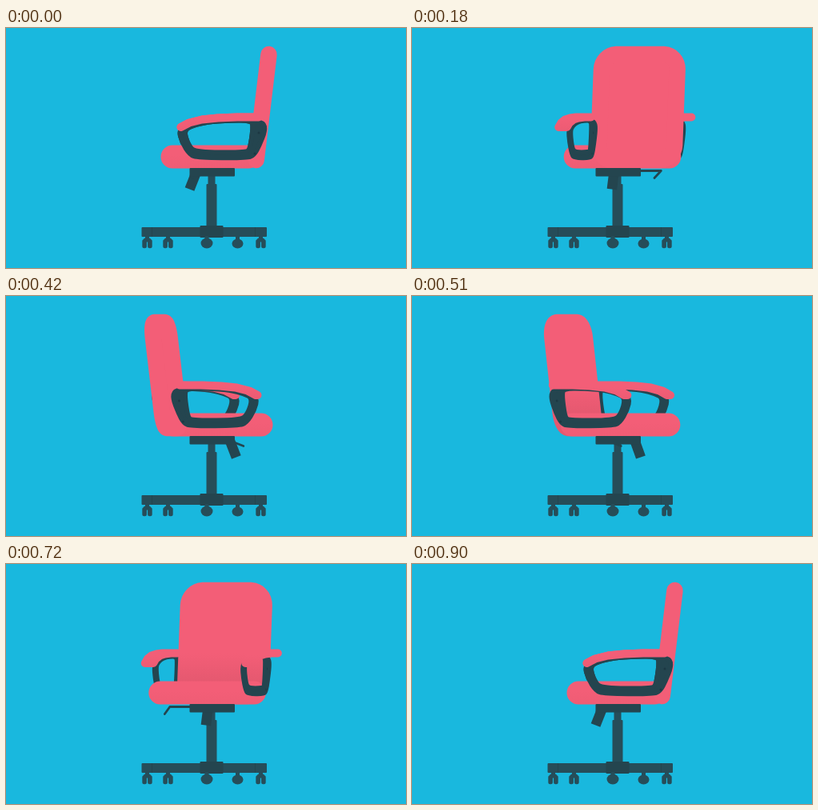
An HTML page with a canvas that plays this animation: 500 by 300 pixels, repeating every 930 ms.

```html
<!DOCTYPE html>
<html lang="en">
<head>
<meta charset="utf-8">
<title>Swivel chair</title>
<style>
html, body { margin: 0; width: 500px; height: 300px; overflow: hidden; background: #19b8de; }
canvas { display: block; }
</style>
</head>
<body>
<canvas id="stage" width="500" height="300"></canvas>
<script>
const ctx = document.getElementById('stage').getContext('2d');
const BG = '#19b8de', PINK = '#f35e77', SHADE = '#e4586f';
const DARK = '#24454f', DEEP = '#1c3843', METAL = '#264d59';
const AXIS = 259, STEP = 30, STEPS = 31;
let cos = 1, sin = 0;

// u runs front to back, v from side to side, y is the screen height
const project = ([u, v, y]) => [AXIS + u * cos + v * sin, y];

function line(points) {
  points.map(project).forEach(([x, y], i) => i ? ctx.lineTo(x, y) : ctx.moveTo(x, y));
}

function smooth(points) {
  const p = points.map(project), n = p.length;
  const mid = i => [(p[i % n][0] + p[(i + 1) % n][0]) / 2, (p[i % n][1] + p[(i + 1) % n][1]) / 2];
  ctx.moveTo(...mid(0));
  for (let i = 1; i <= n; i++) ctx.quadraticCurveTo(...p[i % n], ...mid(i));
  ctx.closePath();
}

// Fill and outline the current path, so it gets a round thickness
function puff(color, width) {
  ctx.fillStyle = ctx.strokeStyle = color;
  ctx.lineWidth = width;
  ctx.lineJoin = ctx.lineCap = 'round';
  ctx.fill('evenodd');
  ctx.stroke();
}

function fade(y0, y1, from, to) {
  const g = ctx.createLinearGradient(0, y0, 0, y1);
  g.addColorStop(0, from);
  g.addColorStop(1, to);
  return g;
}

// Points of a rounded rectangle; r1 rounds the low-q corners, r2 the others
function roundRect(p0, p1, q0, q1, r1, r2) {
  const corners = [[p1 - r2, q1 - r2, r2], [p0 + r2, q1 - r2, r2], [p0 + r1, q0 + r1, r1], [p1 - r1, q0 + r1, r1]];
  return corners.flatMap(([p, q, r], k) => Array.from({ length: 9 }, (_, i) => {
    const a = (k + i / 8) * Math.PI / 2;
    return [p + r * Math.cos(a), q + r * Math.sin(a)];
  }));
}

const backShape = roundRect(-45, 54.5, 33, 165, 19, 19)
  .map(([v, y]) => [69.5 - (y - 33) * 0.12, v, y]);
const seatShape = roundRect(-43, 55, -51, 44, 7, 12).map(([v, u]) => [u, v, 161]);
const frameOuter = [[-43, 127], [-39, 143], [-29, 158.5], [-19, 162], [42, 162.5], [51, 159],
  [58, 146], [65, 128], [63, 118], [40, 114], [16, 114], [-10, 116], [-28, 121]];
const frameHole = [[-37, 128], [-31, 147], [-22, 155.5], [40, 155.5], [46, 152],
  [50, 124], [48, 115.5], [20, 115.3], [-8, 117.5], [-26, 122]];
const padLine = [[-40.5, 124], [-30, 118.5], [-14, 114.5], [6, 112.5], [30, 111.5], [57, 111.5]];
const screws = [[57, 131], [52, 157]];

function drawBack() {
  ctx.beginPath();
  line(backShape);
  ctx.closePath();
  puff(sin < -0.1 ? fade(112, 150, PINK, SHADE) : PINK, 20.5);
}

function drawSeat() {
  ctx.beginPath();
  line(seatShape);
  ctx.closePath();
  puff(fade(158, 178, PINK, '#ee5c74'), 29);
}

function drawArm(side, near) {
  const v = 5.5 + side * 58, pad = 5 + side * 66;
  const at = ([u, y]) => [u, v, y];
  ctx.beginPath();
  smooth(frameOuter.map(at));
  smooth(frameHole.map(at));
  puff(DARK, 6);
  if (near && Math.abs(cos) > 0.3) {
    ctx.fillStyle = DEEP;
    for (const s of screws) {
      const [x, y] = project(at(s));
      ctx.beginPath();
      ctx.ellipse(x, y, 1.5 * Math.abs(cos), 1.5, 0, 0, 7);
      ctx.fill();
    }
  }
  ctx.beginPath();
  line([...padLine.map(([u, y]) => [u, pad + 5.5, y]),
    ...padLine.map(([u, y]) => [u, pad - 5.5, y]).reverse()]);
  ctx.closePath();
  puff(fade(114, 130, PINK, '#ec5b73'), 10);
}

function stroke(points, width, color, cap) {
  ctx.beginPath();
  line(points);
  ctx.lineCap = cap;
  ctx.lineJoin = 'round';
  ctx.lineWidth = width;
  ctx.strokeStyle = color;
  ctx.stroke();
}

const drawKnob = () => stroke([[-21, 0, 180], [-29.5, 0, 201.5]], 12.5, DARK, 'butt');
const drawLever = () => stroke([[0, 15, 178.5], [-3, 56, 178.5], [-27, 55, 187.5]], 2.8, DARK, 'round');

function box(x, y, w, h, color, r = 1) {
  ctx.fillStyle = color;
  ctx.beginPath();
  ctx.roundRect(x, y, w, h, r);
  ctx.fill();
}

function stem(x) {
  box(x - 2.5, 260, 5, 6, METAL);
}

function twinWheel(x) {
  stem(x);
  box(x - 4.5, 262.5, 9, 5, METAL, 2);
  for (const left of [x - 6.2, x + 0.6]) box(left, 264, 5.6, 11.3, METAL, 2.5);
}

function roundWheel(x, w, h) {
  stem(x);
  ctx.beginPath();
  ctx.ellipse(x, 275.5 - h / 2, w / 2, h / 2, 0, 0, 7);
  ctx.fill();
}

function drawBase() {
  box(252.5, 185, 9, 12, METAL, 0);
  box(250.5, 195, 13, 54, METAL);
  box(169.5, 249, 156.5, 12, METAL);
  box(182, 249, 1, 12, DARK, 0);
  box(311, 249, 1, 12, DARK, 0);
  box(242.5, 247, 29, 15, DARK);
  [176.5, 202.5, 318.5].forEach(twinWheel);
  roundWheel(251, 15, 13);
  roundWheel(289.5, 14, 12);
}

function draw(step) {
  const a = step * 12 * Math.PI / 180;
  cos = Math.cos(a);
  sin = Math.sin(a);
  ctx.fillStyle = BG;
  ctx.fillRect(0, 0, 500, 300);

  const nearSide = cos > 0 ? -1 : 1;
  drawArm(-nearSide, false);
  const body = [drawBack, drawSeat];
  if (sin > -1e-6) body.reverse();
  body.forEach(part => part());

  drawBase();
  drawKnob();
  drawLever();
  box(229.5, 175, 56.5, 10.5, DARK);
  drawArm(nearSide, true);
}

const start = performance.now();
function tick() {
  draw(Math.floor((performance.now() - start) / STEP) % STEPS);
  requestAnimationFrame(tick);
}
tick();
</script>
</body>
</html>
```
